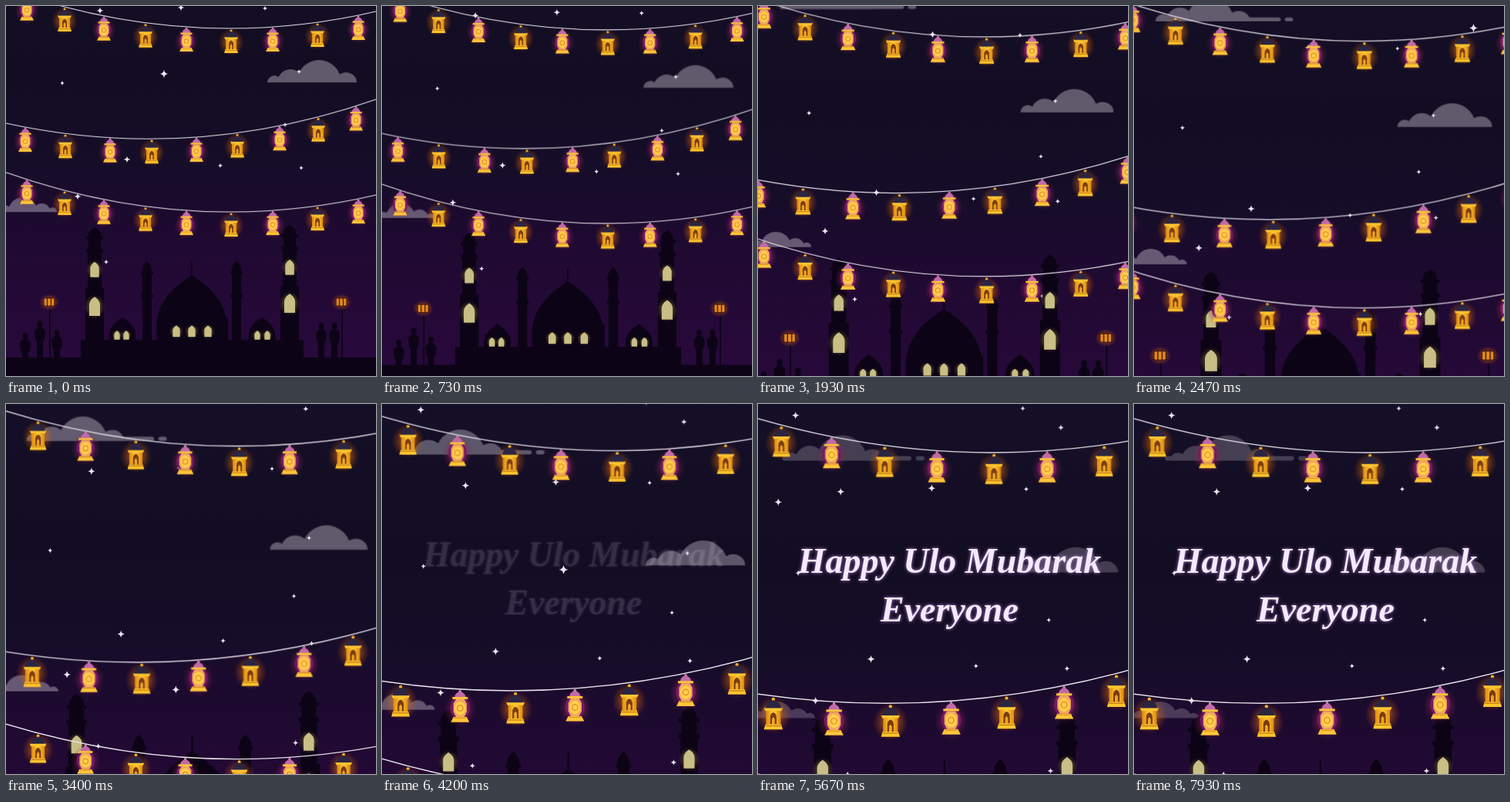
An HTML page that plays this animation: 480x480 px, repeating every 8 s.

```html
<!DOCTYPE html>
<html lang="en">
<head>
<meta charset="utf-8">
<title>Night greeting</title>
<style>
  html, body { margin: 0; width: 100%; height: 100%; overflow: hidden; background: #130e23; }
  svg { display: block; width: 100vw; height: 100vh; }
  text { font: italic bold 40.9px "Liberation Serif", "Times New Roman", serif; text-anchor: middle;
         fill: #f5eafc; filter: drop-shadow(0 0 2px #a878c8); }
</style>
</head>
<body>
<svg viewBox="0 0 480 480">
  <defs>
    <linearGradient id="night" gradientUnits="userSpaceOnUse" x1="0" y1="-100" x2="0" y2="480">
      <stop offset="0" stop-color="#151028"/>
      <stop offset=".3" stop-color="#120d22"/>
      <stop offset=".53" stop-color="#160d29"/>
      <stop offset=".62" stop-color="#1c0a2e"/>
      <stop offset=".8" stop-color="#230935"/>
      <stop offset="1" stop-color="#29093d"/>
    </linearGradient>
    <radialGradient id="amber">
      <stop offset="0" stop-color="#ff9a1c" stop-opacity=".75"/>
      <stop offset=".5" stop-color="#e8740e" stop-opacity=".4"/>
      <stop offset="1" stop-color="#c85008" stop-opacity="0"/>
    </radialGradient>
    <radialGradient id="rose">
      <stop offset="0" stop-color="#d04a70" stop-opacity=".8"/>
      <stop offset=".55" stop-color="#9c2a50" stop-opacity=".4"/>
      <stop offset="1" stop-color="#80205a" stop-opacity="0"/>
    </radialGradient>
    <radialGradient id="pale">
      <stop offset="0" stop-color="#f0e080" stop-opacity=".6"/>
      <stop offset="1" stop-color="#c0a040" stop-opacity="0"/>
    </radialGradient>
    <linearGradient id="brass">
      <stop offset="0" stop-color="#e08a10"/>
      <stop offset=".5" stop-color="#ffcb35"/>
      <stop offset="1" stop-color="#e08a10"/>
    </linearGradient>
    <path id="star" d="M0-5Q.5-.5 5 0Q.5 .5 0 5Q-.5 .5-5 0Q-.5-.5 0-5Z" fill="#e8e4f0"/>
    <path id="cloud" d="M-67 0A9 9 0 0 1-49 0ZM-54 0A17 17 0 0 1-20 0ZM-29 0A29 29 0 0 1 29 0ZM21 0A14 13 0 0 1 49 0Z"/>
    <!-- Both lanterns hang from the origin. -->
    <g id="yellow">
      <ellipse cy="18" rx="17" ry="18" fill="url(#amber)"/>
      <circle cy="3" r="1.6" fill="#f0b429"/>
      <path d="M-7.5 12Q-7 5 0 4Q7 5 7.5 12Z" fill="#2c2542"/>
      <path d="M-9 11.5H9L7.5 14.5H-7.5Z" fill="#ffc52e"/>
      <rect x="-7" y="14" width="14" height="13" fill="url(#brass)"/>
      <path d="M-3 27V20Q-3 17 0 15.5Q3 17 3 20V27Z" fill="#7a3c10"/>
      <path d="M-1.4 27V22L0 20L1.4 22V27Z" fill="#f0a424"/>
      <path d="M-7.5 27H7.5L9 32H-9Z" fill="#ffc52e"/>
      <path d="M-7.5 28.5H7.5" stroke="#b96a10" stroke-width=".8"/>
    </g>
    <g id="pink">
      <ellipse cy="19" rx="16" ry="18" fill="url(#rose)"/>
      <ellipse cy="18" rx="9.5" ry="11" fill="#741a66"/>
      <circle cy="2" r="1.4" fill="#d583b8"/>
      <path d="M-5.5 8Q-5 3.5 0 2Q5 3.5 5.5 8Z" fill="#c26aa8"/>
      <path d="M-7.5 7.5H7.5V9.7H-7.5Z" fill="#ffc63a"/>
      <path d="M-4 9.7H4L6.5 14V22L4 27H-4L-6.5 22V14Z" fill="#f3a55e"/>
      <ellipse cy="18.5" rx="5.4" ry="6.6" fill="#ffd04a"/>
      <circle cy="18.5" r="2.8" fill="none" stroke="#e8872c" stroke-width="1"/>
      <path d="M-6.5 27H6.5L9 32H-9Z" fill="#ffc63a"/>
      <path d="M-6 28H6" stroke="#d98a1c" stroke-width=".8"/>
    </g>
    <g id="post">
      <path d="M1 8V74" stroke="#0c0416" stroke-width="1.6"/>
      <ellipse rx="13" ry="11" fill="url(#amber)"/>
      <rect x="-7" y="-4.5" width="14" height="9" rx="2" fill="#e08a1e"/>
      <path d="M-7-5V5M-2.5-5V5M2.5-5V5M7-5V5M-5-5.5H5M-5 5.5H5" stroke="#4a1c14" stroke-width="1.3"/>
    </g>
    <g id="window">
      <ellipse cy="0" rx="1" ry="1.05" fill="url(#pale)"/>
      <path d="M-.52 .8V-.2Q-.5-.55 0-.85Q.5-.55 .52-.2V.8Z" fill="#c8be86"/>
    </g>
  </defs>
  <g id="sky">
    <rect x="-50" y="-110" width="580" height="600" fill="url(#night)"/>
    <g id="clouds" fill="#d8d0dc">
      <g id="highTail"><rect y="-5" width="149" height="5" rx="2.5"/><rect x="154" y="-5" width="10" height="5" rx="2.5"/></g>
      <use id="highCloud" href="#cloud"/>
      <use id="rightCloud" href="#cloud"/>
      <use id="leftCloud" href="#cloud"/>
    </g>
    <g id="stars"></g>
    <g id="greeting"><text x="247.5" y="99.6">Happy Ulo Mubarak</text><text x="247.5" y="155.6">Everyone</text></g>
  </g>
  <g id="town"></g>
  <g id="low"></g>
  <g id="middle"></g>
  <g id="high"></g>
</svg>
<script>
const LOOP = 8000;
const $ = id => document.getElementById(id);
const clamp = v => Math.min(1, Math.max(0, v));
const use = (id, x, y, sx = 1, sy = sx) =>
  `<use href="#${id}" transform="translate(${x} ${y}) scale(${sx} ${sy})"/>`;

// Final zoom, horizontal centre and downward travel of each depth.
const layers = {
  sky:    { zoom: 1.125, cx: 240, drop: 107 },
  town:   { zoom: 1.253, cx: 238, drop: 46 },
  low:    { zoom: 1.277, cx: 241, drop: 183 },
  middle: { zoom: 1.357, cx: 237, drop: 154.6 },
  high:   { zoom: 1.277, cx: 241, drop: 26 }
};

// Each string is the parabola y = top + slope*x - bend*x².
function garland(id, top, slope, bend, xs) {
  const y = x => top + slope * x - bend * x * x;
  $(id).innerHTML =
    `<path d="M0 ${top}Q240 ${top + 240 * slope} 480 ${y(480)}" fill="none" stroke="#e6e0ea" stroke-width="1.1"/>` +
    xs.map((x, i) => use(i % 2 ? 'yellow' : 'pink', x, y(x))).join('');
}
const outerXs = [27, 76, 127, 181, 234, 292, 346, 404, 457];
garland('high', -22.3, .3538, .00061, outerXs);
garland('low', 215.7, .3538, .00061, outerXs);
garland('middle', 152, .2184, .00059, [25, 77, 135, 189, 247, 300, 355, 405, 454]);

const steadyStars = [
  [122, 6, .9], [227, 2, .9], [336, 3, .6], [73, 100, .65], [362, 154, .6], [157, 199, .9],
  [278, 207, .6], [383, 210, .65], [93, 247, .9], [130, 332, .7], [380, 85, .6],
  [70, -82, .9], [332, -90, .6], [376, -68, .7], [364, 328, .7]
];
// x, y, size, time of the brightest moment
const flashes = [
  [205, 88, 1.1, 0], [50, 18, 1, 1400], [429, -22, 1.1, 2470],
  [222, 265, 1, 3400], [236, 104, 1.1, 4200], [50, 18, .9, 5670]
];
$('stars').innerHTML = steadyStars.map(s => use('star', ...s)).join('') +
  flashes.map(([x, y]) => use('star', x, y)).join('');
const flashNodes = [...$('stars').children].slice(steadyStars.length);

const box = (x, y, w, h) => `M${x} ${y}h${w}v${h}h${-w}Z`;
const dome = (x, base, r, h) =>
  `M${x - r} ${base}C${x - r * 1.15} ${base - h * .55} ${x - r * .55} ${base - h * .8} ${x} ${base - h}` +
  `C${x + r * .55} ${base - h * .8} ${x + r * 1.15} ${base - h * .55} ${x + r} ${base}Z`;
const tower = (x, y) =>
  dome(x, y + 300, 8, 13) + box(x - 11, y + 299, 22, 4) + box(x - 8, y + 302, 16, 14) +
  box(x - 11, y + 315, 22, 5) + box(x - 9, y + 319, 18, 50) + box(x - 12, y + 366, 24, 70 - y) +
  box(x - 18, 433, 36, 24);
const minaret = x =>
  dome(x, 345, 6, 14) + box(x - 8, 344, 16, 4) + box(x - 6, 347, 12, 28) +
  box(x - 8, 374, 16, 4) + box(x - 6, 377, 12, 58);
const person = (x, h) => {
  const y = 457 - h;
  return `M${x - 3.5} ${y + 4}a3.5 4 0 0 1 7 0a3.5 4 0 0 1-7 0Z` +
    `M${x - 3} ${y + 8}h6l4 5-1 11-2 1v${h - 25}h-8v${25 - h}l-2-1-1-11Z`;
};

const skyline = box(-60, 456, 600, 60) + box(110, 433, 262, 24) +
  tower(115, 0) + tower(368, -3) + minaret(183) + minaret(299) +
  dome(241, 433, 45, 84) + box(196, 405, 92, 30) + box(240, 332, 2, 20) +
  dome(151, 434, 17, 30) + dome(332, 434, 17, 30) +
  'M233 313a8 8 0 1 0 15 6a7 7 0 0 1-15-6Z' +
  [[25, 33], [44, 48], [66, 37], [409, 46], [426, 46]].map(p => person(...p)).join('');
const windows = [
  [115, 342, 11, 12], [115, 390, 13.5, 15], [368, 339, 11, 12], [368, 386, 13.5, 15],
  [221, 422, 9, 9], [241, 422, 9, 9], [262, 422, 9, 9],
  [144, 427, 7, 7], [156, 427, 7, 7], [326, 427, 7, 7], [339, 427, 7, 7]
];
$('town').innerHTML = `<path d="${skyline}" fill="#0c0416"/>` +
  use('post', 56, 384) + use('post', 435, 384) +
  windows.map(w => use('window', ...w)).join('');

const place = (id, x, y, scale = '1') =>
  $(id).setAttribute('transform', `translate(${x} ${y}) scale(${scale})`);

function draw(ms) {
  const t = ms / 1000;
  const p = (1 - Math.cos(Math.PI * clamp((ms + 80) / 5200))) / 2;
  for (const [id, { zoom, cx, drop }] of Object.entries(layers)) {
    const s = 1 + (zoom - 1) * p;
    place(id, cx * (1 - s), drop * p, s);
  }
  place('highTail', 36 + 3.3 * t, -30);
  place('highCloud', 94 + 5.2 * t, -30);
  place('rightCloud', 406 - .6 * t - .3 * t * t, 99);
  place('leftCloud', 22 + 5.2 * t - .1 * t * t, 267, '-.66 .66');

  const shown = clamp((ms - 4080) / 800);
  $('greeting').setAttribute('opacity', shown);
  $('clouds').setAttribute('opacity', .4 - .15 * shown);

  flashes.forEach(([x, y, size, peak], i) => {
    const glow = clamp(1.3 - Math.abs(ms - peak) / 400);
    flashNodes[i].setAttribute('transform', `translate(${x} ${y}) scale(${size * glow})`);
  });
}

const start = performance.now();
function tick() {
  draw((performance.now() - start) % LOOP);
  requestAnimationFrame(tick);
}
tick();
</script>
</body>
</html>
```
